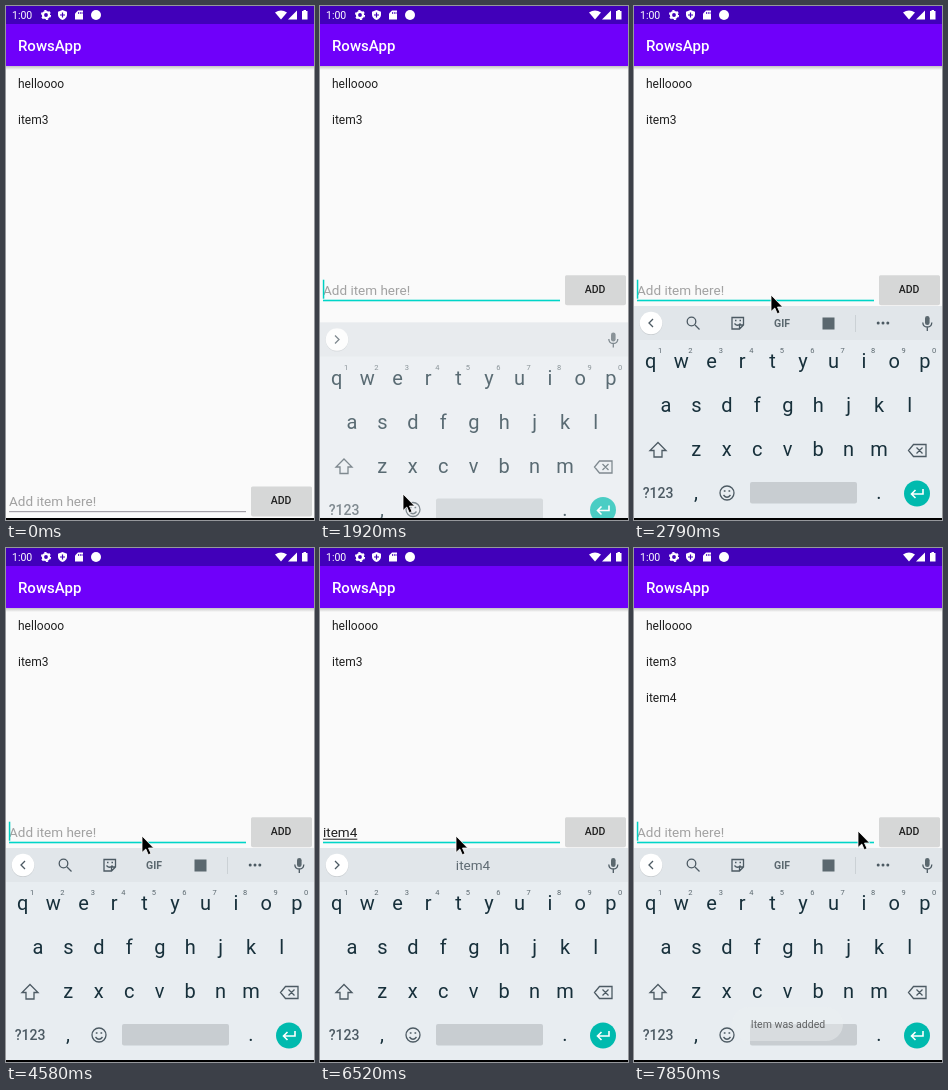
Recreate the animation shown at these times as an HTML page. Size 308 by 514 pixels, loop 8 s.

```html
<!DOCTYPE html>
<html lang="en">
<head>
<meta charset="utf-8">
<title>List screen</title>
<style>
html, body { margin: 0; width: 100%; height: 100%; overflow: hidden; background: #fafafa; }
svg { display: block; font-family: Roboto, sans-serif; white-space: pre; }
.mid { text-anchor: middle; }
.line { fill: none; stroke: #4c5a63; stroke-width: 1.3; }
</style>
</head>
<body>
<svg width="308" height="514" viewBox="0 0 308 514">
  <defs>
    <linearGradient id="shade" x2="0" y2="1">
      <stop stop-color="#000" stop-opacity=".22"/><stop offset="1" stop-color="#000" stop-opacity="0"/>
    </linearGradient>
  </defs>
  <rect width="308" height="514" fill="#fafafa"/>
  <rect y="60" width="308" height="4" fill="url(#shade)"/>
  <rect width="308" height="60" fill="#6f00fa"/>
  <rect width="308" height="18" fill="#4100ba"/>
  <text x="12" y="45" font-size="15" font-weight="500" fill="#fff">RowsApp</text>

  <g fill="#fff">
    <text x="6" y="13" font-size="10.5">1:00</text>
    <circle cx="40" cy="9" r="3" fill="none" stroke="#fff" stroke-width="2.2"/>
    <circle cx="40" cy="9" r="4.4" fill="none" stroke="#fff" stroke-width="1.4" stroke-dasharray="2.3 2.308"/>
    <path d="M56.5 4 61 5.7V9Q60.500 12.700 56.500 14 52.500 12.700 52 9V5.700Z"/>
    <path d="M56.500 6.500V11.500M54 9H59" stroke="#4100ba" stroke-width="1.200"/>
    <path d="M72 4.500H77V13.500H69V7.500Z"/>
    <path d="M72.500 6V8M74.300 6V8M76 6V8" stroke="#4100ba" stroke-width=".8"/>
    <circle cx="90" cy="9" r="5"/>
    <path d="M269 6.500Q275 2.500 281 6.500L275 13.500Z"/>
    <path d="M291 4.500V13.500H282Z"/>
    <path d="M297.500 4H300V5H301.500V13.500H296V5H297.500Z"/>
  </g>

  <g font-size="12" fill="#202020">
    <text x="12" y="82">helloooo</text>
    <text x="12" y="118">item3</text>
    <text id="newRow" x="12" y="154">item4</text>
  </g>

  <g id="form">
    <text id="hint" x="3" y="500" font-size="13.5" fill="#a2a2a2">Add item here!</text>
    <text id="typed" x="3" y="500" font-size="13.5" fill="#202020"></text>
    <rect id="composing" x="3" y="502" height="1" fill="#202020"/>
    <rect id="underline" x="3" width="237"/>
    <rect id="caret" y="485" width="1.5" height="19" fill="#00d0c2"/>
    <rect x="245" y="482" width="61" height="28.500" rx="2" fill="#000" opacity=".14"/>
    <rect id="button" x="245" y="480.500" width="61" height="28.500" rx="1.500"/>
    <text class="mid" x="275" y="498.300" font-size="10.5" font-weight="500" fill="#202020">ADD</text>
  </g>

  <g id="keyboard">
    <rect y="300" width="308" height="240" fill="#e8edf1"/>
    <rect y="300" width="308" height="34" fill="#e1e6ea"/>
    <circle cx="17" cy="317.500" r="11.500" fill="#000" opacity=".1"/>
    <circle cx="17" cy="317" r="11.300" fill="#fff"/>
    <path id="chevron" class="line"/>
    <g id="mic">
      <rect x="291" y="310" width="4.600" height="9" rx="2.300" fill="#5b686f"/>
      <path class="line" d="M288.800 316.500Q289 321 293.300 321 297.600 321 297.800 316.500M293.300 321V325"/>
    </g>
    <g id="tools">
      <path class="line" stroke-width="1.600" d="M61 319 65.500 323.500"/>
      <circle class="line" cx="57.500" cy="315.500" r="4.300"/>
      <path class="line" d="M98 311.500H109.500V319L105.500 323H98ZM109.500 319H105.500V323M100.500 317.500Q103.500 321 106.500 317.500"/>
      <path d="M101 314.500H102.500M105.500 314.500H107" class="line"/>
      <text class="mid" x="148" y="320.700" font-size="10.500" font-weight="700" fill="#5b686f">GIF</text>
      <rect x="188.500" y="311.500" width="12" height="12" fill="#5b686f"/>
      <path d="M221.500 309V326" stroke="#cbd1d5"/>
      <g fill="#4c5a63"><circle cx="244.200" cy="317" r="1.500"/><circle cx="249" cy="317" r="1.500"/><circle cx="253.800" cy="317" r="1.500"/></g>
    </g>
    <g id="suggestions" class="mid" font-size="13.500" fill="#5f6b73">
      <path id="dividers" d="M108.500 309V326M198.500 309V326" stroke="#cbd1d5"/>
      <text x="68" y="322"></text><text x="153" y="322"></text><text x="238" y="322"></text>
    </g>
    <g id="keys" class="mid" font-size="20" fill="#17303b"></g>
    <path class="line" d="M24 436.500 32 444.500H28V451H20V444.500H16Z"/>
    <path class="line" d="M279.500 438.500H292V450.500H279.500L274.500 444.500ZM282.500 441.500 288.500 447.500M288.500 441.500 282.500 447.500"/>
    <text class="mid" x="24" y="492" font-size="14" fill="#4c5a63" font-weight="500">?123</text>
    <circle class="line" cx="93" cy="487" r="7"/>
    <path class="line" d="M89.500 489Q93 493.500 96.500 489M89.800 485H91.500M94.500 485H96.200"/>
    <rect x="116" y="476" width="107" height="21.500" rx="2" fill="#c8cdd1"/>
    <circle cx="283" cy="487.500" r="13" fill="#00baae"/>
    <path d="M289 483V488H278M281.500 484 277.500 488 281.500 492" fill="none" stroke="#fff" stroke-width="1.600"/>
  </g>

  <g id="toast">
    <rect x="98" y="459" width="111" height="34" rx="17" fill="#eceff1" opacity=".7"/>
    <text class="mid" x="154" y="480" font-size="10.500" fill="#222">Item was added</text>
  </g>
  <rect y="512" width="308" height="2" fill="#000"/>
  <path id="mouse" d="M0 0V16.500L3.800 13 6.300 18.800 9 17.600 6.500 12H11.700Z" stroke="#fff" stroke-width=".8"/>
</svg>
<script>
const LOOP = 8000;
const $ = id => document.getElementById(id);
const set = (el, attrs) => { for (const k in attrs) el.setAttribute(k, attrs[k]); };
const show = (el, on) => set(el, { visibility: on ? 'visible' : 'hidden' });

// Each track lists [start time, value...]; a value holds until the next start.
const at = (track, t) => track.findLast(step => step[0] <= t).slice(1);

const mouse = [[0, -50, -50], [440, 149, 505], [590, 128, 493], [1190, 102, 487],
  [1640, 92, 488], [1780, 83, 488], [2350, 95, 440], [2500, 130, 340], [2640, 146, 292],
  [2790, 137, 289], [2940, 136, 288], [7110, 170, 286], [7250, 228, 282],
  [7400, 256, 279], [7700, 250, 280], [7850, 224, 283]];
const typing = [[0, ''], [4870, 'it'], [5170, 'ite'], [5320, 'item'], [5920, 'item4'], [7700, '']];
const proposals = [[0], [4870, 'it', 'its', 'item'], [5170, 'item', 'items', 'ite'],
  [5320, 'item', 'items', 'item2'], [6070, '', 'item4', ''], [7700]];
const blink = [[0, 0], [1490, 1], [2210, 0], [2640, 1], [3090, 0], [3540, 1],
  [3980, 0], [4580, 1], [6520, 0], [7110, 1]];
const keyboardSlide = [[0, 240, 0], [1780, 30, .35], [1920, 16.5, .7], [2060, 0, 1]]; // offset, opacity

const FOCUS = 1490, LIFT = 1640, TOOLS = 2210, PRESS = 7550, ADDED = 7700, TOAST = 7850;

function buildKeys() {
  const rows = [['qwertyuiop', 16.7, 362], ['asdfghjkl', 32, 406], ['zxcvbnm', 62.3, 450]];
  const key = (char, x, y, extra = '') => `<text x="${x}" y="${y}" ${extra}>${char}</text>`;
  let html = key(',', 62, 493) + key('.', 245, 493);
  for (const [letters, left, y] of rows)
    [...letters].forEach((char, i) => html += key(char, left + i * 30.45, y));
  for (let i = 0; i < 10; i++)
    html += key((i + 1) % 10, 26 + i * 30.45, 347, 'font-size="7.5" fill="#5b686f"');
  $('keys').innerHTML = html;
}

function draw(t) {
  set($('mouse'), { transform: `translate(${at(mouse, t)})` });

  const [text] = at(typing, t), focused = t >= FOCUS;
  $('typed').textContent = text;
  const width = text ? $('typed').getComputedTextLength() : 0;
  set($('composing'), { width });
  set($('caret'), { x: 2.8 + width });
  show($('caret'), at(blink, t)[0]);
  show($('hint'), !text);
  set($('underline'), focused ? { y: 505, height: 1.6, fill: '#00d5c8' } : { y: 505, height: 1.2, fill: '#a3a0a8' });
  set($('button'), { fill: t >= PRESS && t < ADDED ? '#c6c8c8' : '#d6d7d7' });
  set($('form'), { transform: `translate(0 ${t >= LIFT ? -211.3 : 0})` });

  const [offset, opacity] = at(keyboardSlide, t);
  set($('keyboard'), { transform: `translate(0 ${offset})`, opacity });
  const words = at(proposals, t), tools = t >= TOOLS && !words.length;
  show($('tools'), tools);
  set($('chevron'), { d: tools ? 'M19 313 15 317 19 321' : 'M15 313 19 317 15 321' });
  document.querySelectorAll('#suggestions text').forEach((el, i) => el.textContent = words[i] || '');
  show($('dividers'), words[0]);

  show($('newRow'), t >= ADDED);
  set($('toast'), { opacity: t >= TOAST ? .65 : 0 });
}

function frame(now) {
  draw(now % LOOP);
  requestAnimationFrame(frame);
}

buildKeys();
draw(0);
requestAnimationFrame(frame);
</script>
</body>
</html>
```
